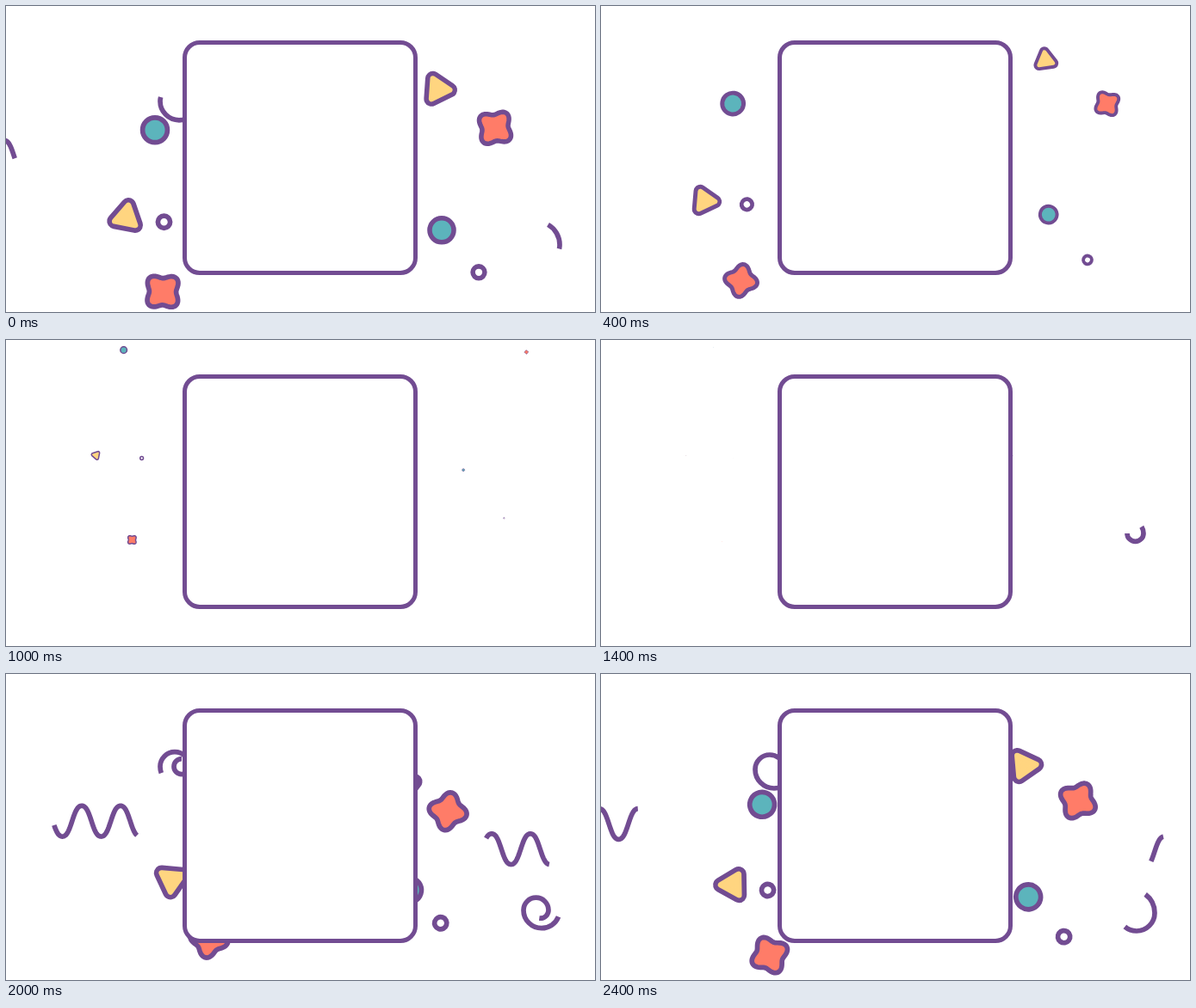
Write an HTML page with a canvas that moves like this. It is 684x356 px and loops after 2600 ms.

```html
<!DOCTYPE html>
<html lang="en">
<head>
<meta charset="utf-8">
<title>Confetti box</title>
<style>
html, body { margin: 0; overflow: hidden; background: #fff; }
canvas { display: block; }
</style>
</head>
<body>
<canvas id="stage" width="684" height="356"></canvas>
<script>
const g = document.getElementById('stage').getContext('2d');
const PURPLE = '#724c92', TEAL = '#5cb4bc', YELLOW = '#ffd580', RED = '#ff7c68';
const STEP = 0.2, LOOP = 2.6, BURST = 1.2; // seconds
const LEFT_LAG = 0.2;                      // the left side runs a little later

// x, y: place 1.4 s into the burst; vx, vy: drift; angle in degrees.
const pieces = [
  { draw: disc, x: 173, y: 144.5, vx: -52, vy: -27 },
  { draw: triangle, x: 139.5, y: 246, vx: -50, vy: 3, angle: -79 },
  { draw: ring, x: 183.5, y: 251.5, vx: -37, vy: 0 },
  { draw: star, x: 182, y: 332.5, vx: -51, vy: 20, angle: 46 },
  { draw: triangle, x: 501.7, y: 97, vx: 38, vy: -35, angle: 4 },
  { draw: star, x: 568, y: 142, vx: 52, vy: -20, angle: 38 },
  { draw: disc, x: 506, y: 261, vx: 36, vy: 6 },
  { draw: ring, x: 549, y: 310, vx: 42, vy: 16 }
];

// Half circles of growing radius, from one angle down to another.
const spirals = [
  { x: 204, y: 111, radii: [9, 17, 22], from: 270, to: -360, lag: LEFT_LAG },
  { x: 620.5, y: 278, radii: [9.5, 14.5, 21, 27], from: 180, to: -420, lag: 0 }
];

const waves = [
  { crest: 43, y: 174.5, end: -4, dir: -1, lag: LEFT_LAG },
  { crest: 609, y: 207, end: 653, dir: 1, lag: 0 }
];

const rad = deg => deg * Math.PI / 180;
const clamp = p => Math.max(0, Math.min(1, p));
const easeOut = p => Math.sin(clamp(p) * Math.PI / 2);
const easeInOut = p => (1 - Math.cos(clamp(p) * Math.PI)) / 2;

// Everything drops into place, then floats up.
const lift = t => -83 * (1 - clamp(t)) ** 2
  - 114 * easeInOut(clamp((t - 1.2) / 1.1) ** 2.1);

function paint(fill, width = 5.7) {
  g.lineWidth = width;
  g.strokeStyle = PURPLE;
  if (fill) { g.fillStyle = fill; g.fill(); }
  g.stroke();
}

function circle(r, fill) {
  g.beginPath();
  g.arc(0, 0, r, 0, 7);
  paint(fill);
}
function disc() { circle(14.4, TEAL); }
function ring() { circle(7.1); }

function polar(count, radius) {
  g.beginPath();
  for (let i = 0; i < count; i++) {
    const a = i / count * 2 * Math.PI, r = radius(a);
    g.lineTo(r * Math.cos(a), r * Math.sin(a));
  }
  g.closePath();
}

function triangle() {
  polar(3, () => 14);
  paint(null, 18);
  g.lineWidth = 6.6;
  g.strokeStyle = g.fillStyle = YELLOW;
  g.fill();
  g.stroke();
}

function star() {
  polar(96, a => 18.9 + 3.3 * Math.cos(4 * a));
  paint(RED);
}

function drawPiece(p, t) {
  const left = p.vx < 0;
  const size = 1 - easeInOut((t - (left ? LEFT_LAG : 0) - 1.25) / 1.45);
  const time = t - 1.4;
  const out = 1 - Math.exp(-1.2 * time);
  g.save();
  g.translate(p.x + p.vx * out, p.y + p.vy * out + lift(t));
  g.rotate(rad((p.angle || 0) + (left ? -90 : 45) * time));
  g.scale(size, size);
  p.draw();
  g.restore();
}

function drawSpiral(p, t) {
  let x = p.x, from = p.from, length = 0;
  g.beginPath();
  p.radii.forEach((r, i) => {
    if (i) x += (i % 2 ? -1 : 1) * (r - p.radii[i - 1]);
    const to = Math.max(p.to, -180 * i);
    g.arc(x, p.y, r, rad(from), rad(to), true);
    length += r * rad(from - to);
    from = to;
  });
  const head = length * easeOut((t - p.lag) / 1.4);
  const tail = length * easeInOut((t - p.lag - 0.59) / 1.15);
  if (head - tail < 1) return;
  g.setLineDash([head - tail, 999]);
  g.lineDashOffset = -tail;
  paint();
  g.setLineDash([]);
}

function drawWave(w, t) {
  const reach = time => w.end - w.dir * 245 * (1 - easeOut((time - w.lag) / 1.1));
  const a = reach(t - 0.34), b = reach(t);
  if (Math.abs(b - a) < 1) return;
  g.beginPath();
  for (let i = 0; i <= 120; i++) {
    const x = a + (b - a) * i / 120;
    const turn = (x - w.crest) / 45 * 2 * Math.PI;
    g.lineTo(x, w.y - 18.8 * (Math.cos(turn) - 0.05 * Math.cos(3 * turn)));
  }
  paint();
}

function drawBurst(t) {
  if (t < 0) return;
  g.save();
  g.translate(0, lift(t));
  waves.forEach(w => drawWave(w, t));
  spirals.forEach(p => drawSpiral(p, t));
  g.restore();
  pieces.forEach(p => drawPiece(p, t));
}

function drawBox() {
  g.beginPath();
  g.roundRect(207.5, 42.5, 268, 268, 17.5);
  paint('#fff', 5);
}

const start = performance.now();
function frame() {
  const elapsed = (performance.now() - start) / 1000 % LOOP;
  const t = Math.floor(elapsed / STEP) * STEP; // the picture moves in steps
  g.fillStyle = '#fff';
  g.fillRect(0, 0, 684, 356);
  g.lineJoin = 'round';
  drawBurst(t + LOOP - BURST); // the previous burst dying away
  drawBurst(t - BURST);
  drawBox();
  requestAnimationFrame(frame);
}
frame();
</script>
</body>
</html>
```
